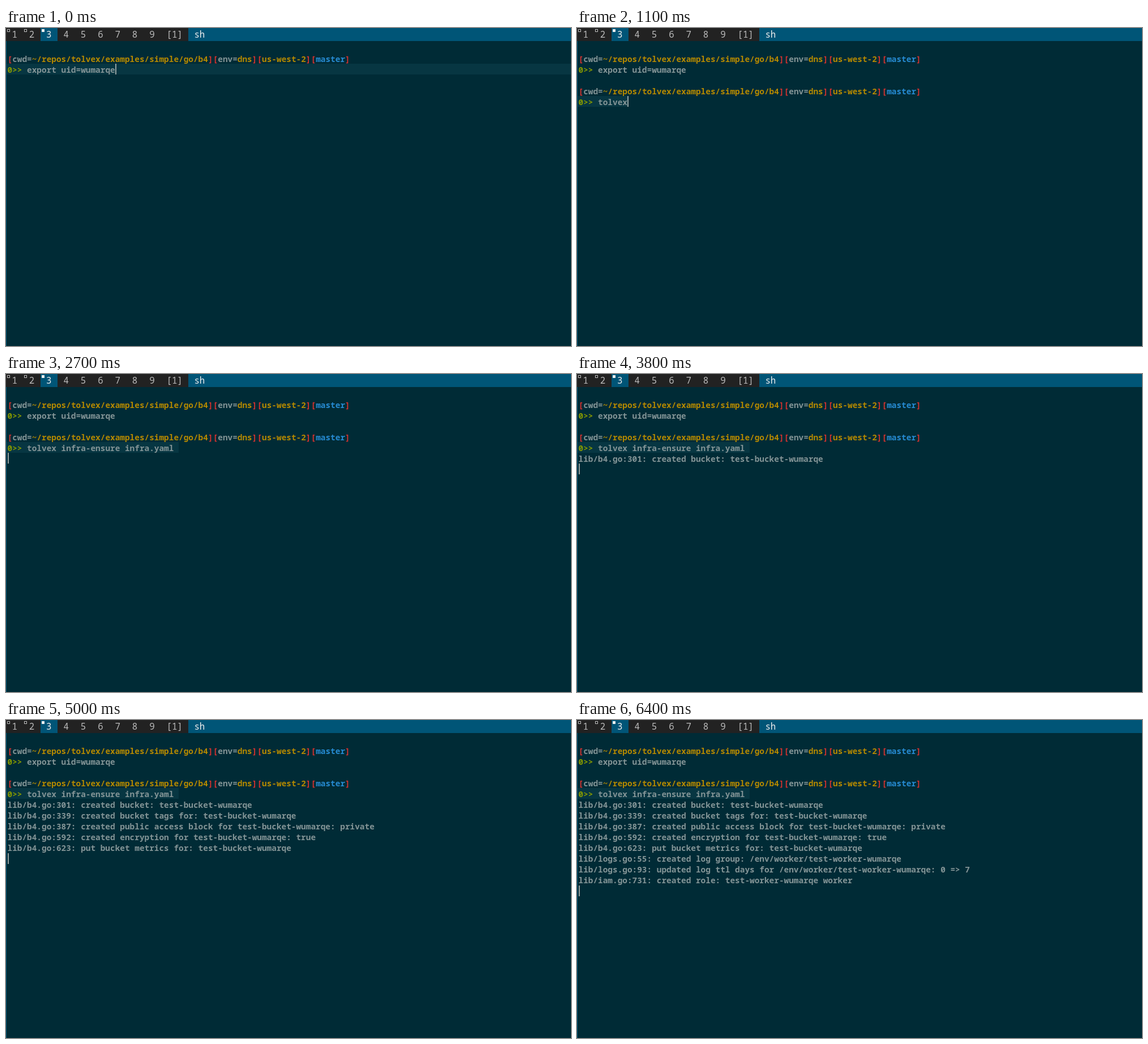
Animation of 998 by 561 pixels, one loop 8 s. Source, as an HTML page:

```html
<!DOCTYPE html>
<html lang="en">
<head>
<meta charset="utf-8">
<title>Terminal session</title>
<style>
html, body { margin: 0; width: 100%; height: 100%; overflow: hidden; background: #002b36; }
body, pre { font-family: "Noto Sans Mono", "DejaVu Sans Mono", monospace; }
div, pre, i { position: absolute; margin: 0; }
#edge { left: 0; top: 23px; width: 1px; bottom: 0; background: #057; }
#bar { left: 0; top: 0; width: 100%; height: 23px; background: #057; color: #bbb; font-size: 15.8px; line-height: 23px; white-space: pre; }
#bar div { top: 0; height: 23px; padding-left: 10.4px; box-sizing: border-box; background: #222; }
#bar .on { background: #057; color: #eee; }
#bar i { left: 2px; top: 2px; width: 5px; height: 5px; box-sizing: border-box; border: 1px solid #bbb; }
#bar .on i { background: #eee; border-color: #eee; }
#lit { left: 1px; height: 19px; background: #073642; }
#cursor { width: 2px; height: 19px; background: #93a1a1; }
#text { left: 2.5px; top: 44.5px; color: #839496; font-size: 14.42px; font-weight: 600; line-height: 19.07px; }
.r { color: #dc322f; } .y { color: #b58900; } .b { color: #268bd2; } .g { color: #859900; }
</style>
</head>
<body>
<div id="edge"></div>
<div id="bar"></div>
<div id="lit"></div>
<pre id="text"></pre>
<div id="cursor"></div>
<script>
const LOOP = 8000, LEFT = 2.5, TOP = 44, ROW = 19.07, CELL = 8.652, TAB = 30.35;
const $ = id => document.getElementById(id);
const tint = (c, s) => `<span class="${c}">${s}</span>`;
const box = s => tint('r', '[') + s + tint('r', ']');

const uid = 'wumarqe', bucket = 'test-bucket-' + uid, worker = 'test-worker-' + uid;
const prompt = box('cwd=' + tint('y', '~/repos/tolvex/examples/simple/go/b4')) +
  box('env=' + tint('y', 'dns')) + box(tint('y', 'us-west-2')) + box(tint('b', 'master'));
const mark = tint('g', '0&gt;&gt;') + ' ';
const first = 'export uid=' + uid, command = 'tolvex infra-ensure infra.yaml ';

// [time, characters typed]
const keys = [[700, 1], [800, 3], [1000, 5], [1100, 6], [1500, 7], [1600, 9], [1700, 10], [1800, 12],
  [1900, 13], [2000, 15], [2100, 16], [2200, 18], [2300, 20], [2400, 21], [2500, 31]];
const enter = 2700;
const logs = [
  [3800, `b4.go:301: created bucket: ${bucket}`],
  [4100, `b4.go:339: created bucket tags for: ${bucket}`],
  [4400, `b4.go:387: created public access block for ${bucket}: private`],
  [4900, `b4.go:592: created encryption for ${bucket}: true`],
  [5000, `b4.go:623: put bucket metrics for: ${bucket}`],
  [5700, `logs.go:55: created log group: /env/worker/${worker}`],
  [5800, `logs.go:93: updated log ttl days for /env/worker/${worker}: 0 =&gt; 7`],
  [6400, `iam.go:731: created role: ${worker} worker`]
];

$('bar').innerHTML = [1, 2, 3, 4, 5, 6, 7, 8, 9, '[1]'].map((label, i) =>
  `<div class="${i == 2 ? 'on' : ''}" style="left:${i * TAB}px;width:${i < 9 ? TAB : 49}px">${i < 3 ? '<i></i>' : ''}${label}</div>`
).join('') + '<div class="on" style="left:322px">sh</div>';

let shown = '';
function draw(t) {
  const lines = [prompt, mark + first];
  let row = 1, col = 4 + first.length, lit = 998;
  if (t >= 300) {
    const typed = keys.filter(k => k[0] <= t).reduce((n, k) => k[1], 0);
    lines.push('', prompt, mark + command.slice(0, typed));
    row = 4;
    col = 4 + typed;
    // the highlight trails the cursor by a cell during fast typing
    lit = LEFT + CELL * (col - (t >= 1500 && t < 2400));
  }
  const litRow = row;
  if (t >= enter) {
    const out = logs.filter(l => l[0] <= t).map(l => 'lib/' + l[1]);
    lines.push(...out);
    row = 5 + out.length;
    col = 0;
  }
  const html = lines.join('\n');
  if (html != shown) $('text').innerHTML = shown = html;
  $('lit').style.top = Math.round(TOP + ROW * litRow) + 'px';
  $('lit').style.width = lit - 1 + 'px';
  $('cursor').style.top = Math.round(TOP + ROW * row) + 'px';
  $('cursor').style.left = Math.round(LEFT + CELL * col) + 'px';
}

const start = performance.now();
function tick() {
  draw((performance.now() - start) % LOOP);
  requestAnimationFrame(tick);
}
tick();
</script>
</body>
</html>
```
